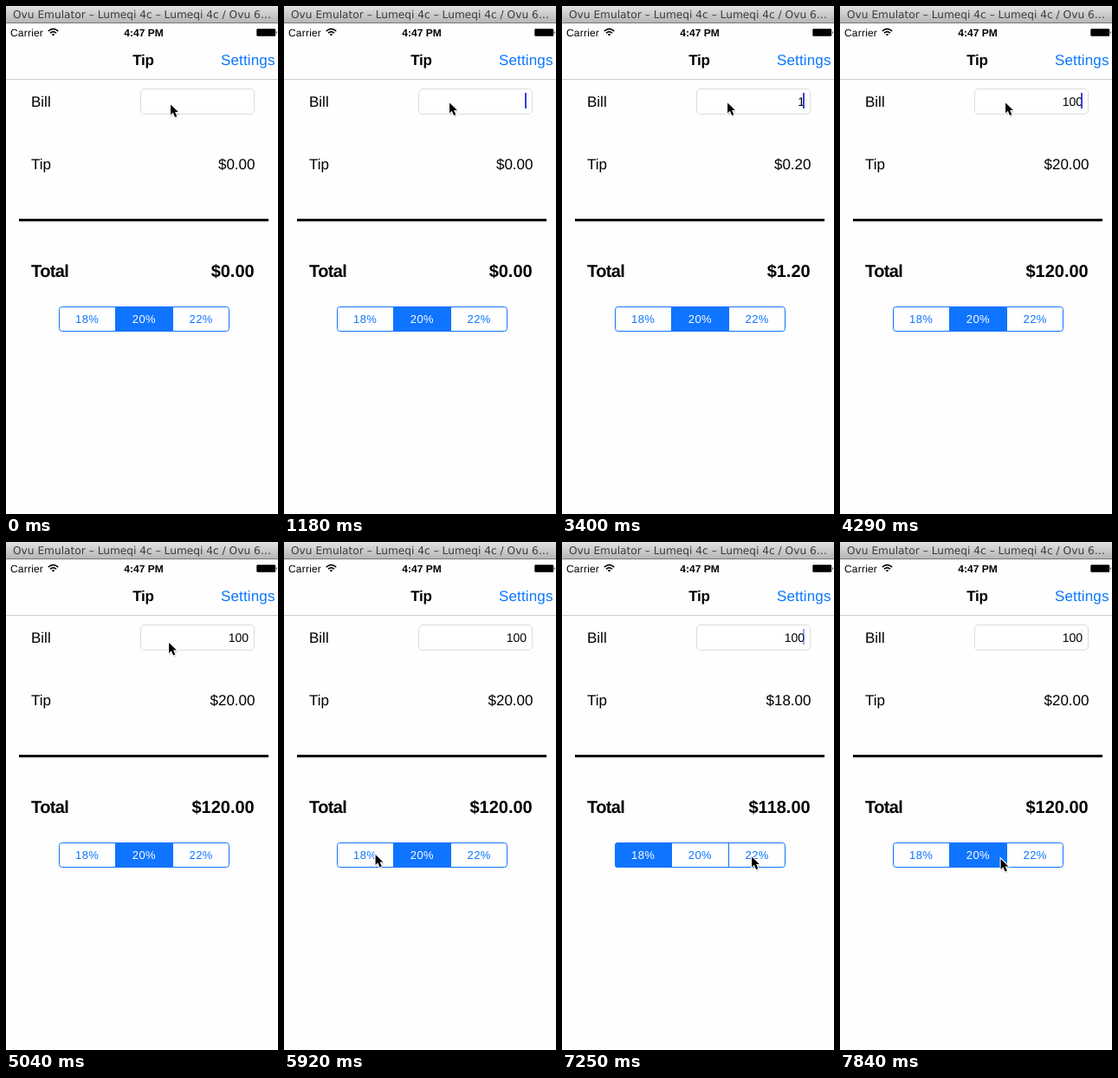
Recreate the animation shown at these times as an HTML page. Size 314 by 585 pixels, loop 7.99 s.

```html
<!DOCTYPE html>
<html lang="en">
<head>
<meta charset="utf-8">
<title>Tip calculator</title>
<style>
  html, body { margin: 0; width: 100%; height: 100%; overflow: hidden; background: #fefefe; }
  svg { display: block; width: 314px; height: 585px; }
  text { font: 17px "Liberation Sans", Arial, sans-serif; text-rendering: geometricPrecision; }
  .bold { font-weight: bold; }
  .end { text-anchor: end; }
  .mid { text-anchor: middle; }
  .window { font: 12.2px "DejaVu Sans", sans-serif; fill: #3c3c3c; }
  .status { font-size: 12px; }
  .total { font-size: 20px; }
  .field { font-size: 14px; }
  .link { fill: #0a78ff; letter-spacing: .15px; }
  .seg text { font-size: 13px; letter-spacing: .4px; text-anchor: middle; }
</style>
</head>
<body>
<svg viewBox="0 0 314 585">
  <defs>
    <linearGradient id="chrome" x2="0" y2="1">
      <stop stop-color="#e2e2e2"/>
      <stop offset="1" stop-color="#b4b4b4"/>
    </linearGradient>
    <clipPath id="pill"><rect x="61" y="346" width="197" height="29" rx="3.5"/></clipPath>
  </defs>

  <rect width="314" height="20" fill="url(#chrome)"/>
  <rect y="19" width="314" height="1" fill="#777"/>
  <text class="window" x="8" y="14">Ovu Emulator – Lumeqi 4c – Lumeqi 4c / Ovu 6…</text>

  <text class="status" x="5" y="34.5" letter-spacing=".2">Carrier</text>
  <g fill="none" stroke="#000" stroke-width="1.6">
    <path d="M48.8 28.8Q54.5 24 60.2 28.8M51 31.2Q54.5 28.2 58 31.2"/>
    <path d="M52.6 32.6Q54.5 31.2 56.4 32.6L54.5 34.6Z" fill="#000" stroke="none"/>
  </g>
  <text class="status bold mid" x="159" y="34.5">4:47 PM</text>
  <rect x="289.3" y="26.2" width="21.9" height="8.6" rx="1.3"/>
  <path d="M312 28.8Q313.7 30.5 312 32.2Z"/>

  <text class="bold mid" x="158.5" y="68" letter-spacing="-.2">Tip</text>
  <text class="link" x="248" y="68">Settings</text>
  <rect y="84" width="314" height="1" fill="#cfcfcf"/>

  <text x="29" y="115.5">Bill</text>
  <rect x="155.5" y="95.5" width="131" height="29" rx="4.5" fill="#fff" stroke="#dcdcdc"/>
  <text id="bill" class="field end" x="280" y="115"></text>
  <rect id="caret" x="278" y="100" width="2" height="18" fill="#3440dc"/>

  <text x="29" y="187.5">Tip</text>
  <text id="tip" class="end" x="287.5" y="187.5"></text>
  <rect x="15" y="245" width="288" height="3"/>
  <text class="total bold" x="29" y="312" letter-spacing="-.6">Total</text>
  <text id="total" class="total bold end" x="286.7" y="312"></text>

  <g id="segs" class="seg" fill="#0f74ff"></g>
  <path d="M126.5 346V375M192.5 346V375" stroke="#0f74ff"/>
  <rect x="61.5" y="346.5" width="196" height="28" rx="3" fill="none" stroke="#0f74ff"/>

  <g id="cursor">
    <path d="M1 3V16L4 13.3L6.2 18L8.9 17L6.7 12.5H11Z" opacity=".18"/>
    <path d="M.6 1.4V13.4L3.3 10.8L5.6 16L7.9 15L5.6 10H9.4Z"
          stroke="#fff" stroke-width="2" paint-order="stroke"/>
  </g>
</svg>
<script>
  const LOOP = 7990, TICKS = 54;
  const RATES = [18, 20, 22];
  const FOCUS = 8;
  const KEYS = [16, 26, 29];       // ticks at which "100" is typed
  const TAPS = [{ at: 0, seg: 1 }, { at: 43, seg: 0 }, { at: 52, seg: 1 }];
  const STOPS = [                  // pointer rests: tick, x, y
    [0, 189.5, 112], [2, 190.5, 110], [31, 190.5, 110], [34, 187.5, 114.5],
    [40, 105, 358.5], [44, 105, 358.5], [49, 218.5, 361], [52, 185, 363.5]
  ];

  const $ = id => document.getElementById(id);
  const clamp = v => Math.min(1, Math.max(0, v));
  const ease = p => p * p * (3 - 2 * p);
  const money = n => "$" + n.toFixed(2);

  $("segs").innerHTML = RATES.map((rate, i) => {
    const x = 61 + i * 65.75;
    return `<rect x="${x}" y="346" width="65.5" height="29" clip-path="url(#pill)"/>
      <text x="${x + 32.7}" y="365">${rate}%</text>`;
  }).join("");
  const fills = document.querySelectorAll(".seg rect");
  const labels = document.querySelectorAll(".seg text");

  function pointer(k) {
    const i = STOPS.findLastIndex(stop => stop[0] <= k);
    const [t0, x0, y0] = STOPS[i];
    const [t1, x1, y1] = STOPS[i + 1] || [t0 + 1, x0, y0];
    const p = ease((k - t0) / (t1 - t0));
    return [x0 + (x1 - x0) * p, y0 + (y1 - y0) * p];
  }

  // Blinks every seven ticks, restarting with each key press.
  function caret(k) {
    if (k < FOCUS) return 0;
    const since = k - [FOCUS, ...KEYS].findLast(key => key <= k);
    return clamp(.55 + 1.2 * Math.cos((since - .8) * 2 * Math.PI / 7));
  }

  function draw(k) {
    const typed = "100".slice(0, KEYS.filter(key => key <= k).length);
    const tap = TAPS.findLast(tap => tap.at <= k);
    const before = TAPS[TAPS.indexOf(tap) - 1];
    const fading = before && k === tap.at;
    const tip = typed * RATES[tap.seg] / 100;

    $("bill").textContent = typed;
    $("tip").textContent = money(tip);
    $("total").textContent = money(+typed + tip);
    $("caret").setAttribute("opacity", caret(k));
    $("cursor").setAttribute("transform", `translate(${pointer(k)})`);
    RATES.forEach((_, i) => {
      const on = i === tap.seg;
      const mixed = fading && (on || i === before.seg);
      fills[i].setAttribute("opacity", mixed ? (on ? .86 : .2) : +on);
      labels[i].setAttribute("fill", on ? "#fff" : "#0f74ff");
      labels[i].setAttribute("opacity", mixed ? .8 : 1);
    });
  }

  const start = performance.now();
  function frame() {
    const t = (performance.now() - start) % LOOP;
    draw(Math.min(TICKS - 1, Math.floor((t + 8) * TICKS / LOOP)));
    requestAnimationFrame(frame);
  }
  frame();
</script>
</body>
</html>
```
